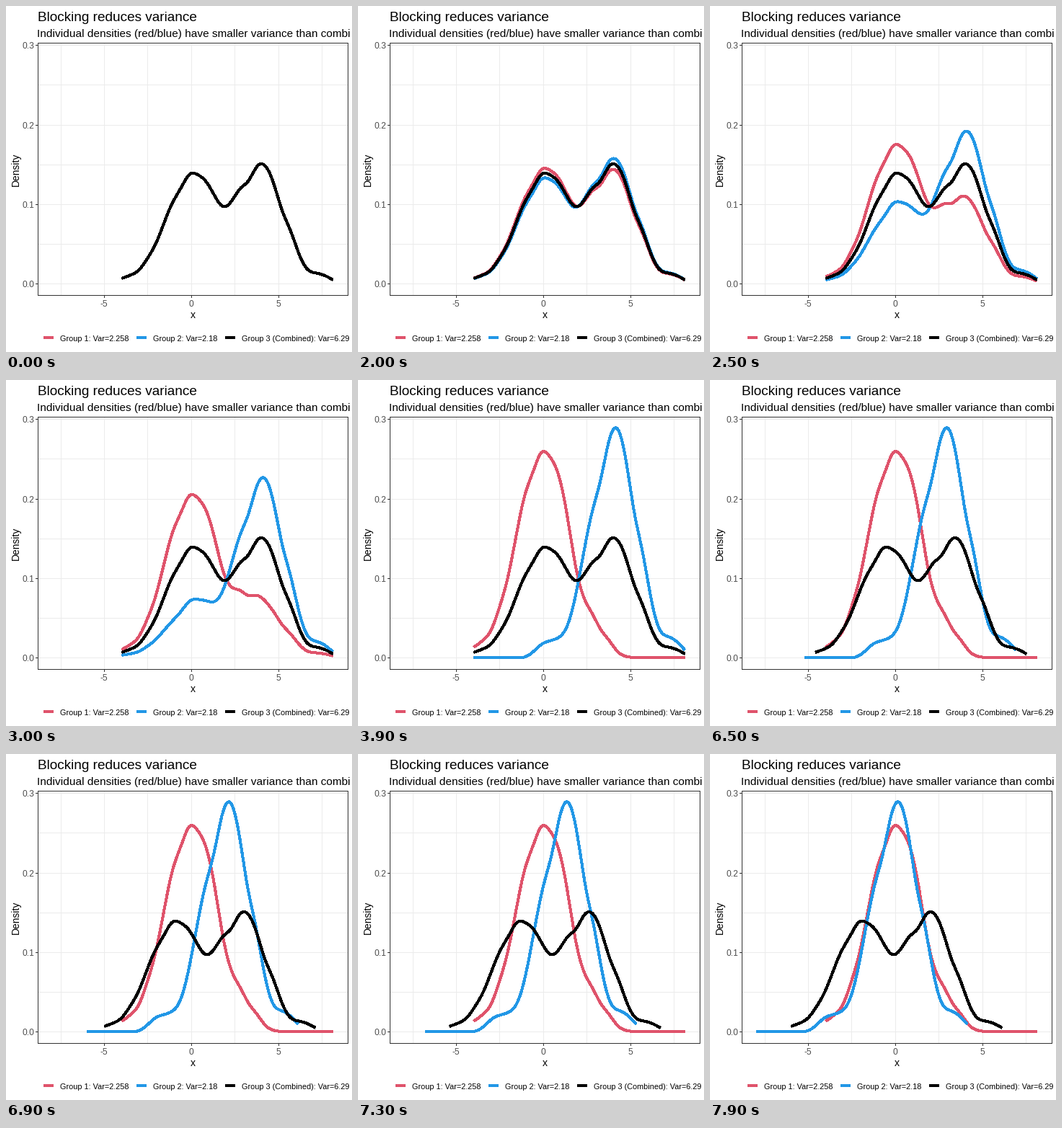
Recreate the animation shown at these times as a matplotlib script. Size 480x480 px, loop 10 s.

```python
import numpy as np
import matplotlib.pyplot as plt
from matplotlib.animation import FuncAnimation
from matplotlib.patches import Rectangle

SIZE, DPI = 480, 80
PT = 72 / DPI                      # points per pixel
RED, BLUE, BLACK = "#DF536B", "#2297E6", "black"
GRID, FRAME, TICK_TEXT = "#EBEBEB", "#333333", "#4D4D4D"
LEFT, RIGHT, TOP, BOTTOM = 44, 474, 51, 401

plt.rcParams["font.family"] = "Liberation Sans"


def px(x):
    return 256.8 + 24.16 * x


def py(density):
    return 384.98 - 1102.2 * density


def spline(knots, values, x):
    """Natural cubic spline on evenly spaced knots."""
    n, h = len(knots), knots[1] - knots[0]
    system = np.eye(n)
    rhs = np.zeros(n)
    for i in range(1, n - 1):
        system[i, i - 1:i + 2] = 1, 4, 1
        rhs[i] = 6 * (values[i - 1] - 2 * values[i] + values[i + 1]) / h**2
    m = np.linalg.solve(system, rhs)
    i = np.clip(((x - knots[0]) / h).astype(int), 0, n - 2)
    b = (x - knots[i]) / h
    a = 1 - b
    return (a * values[i] + b * values[i + 1]
            + ((a**3 - a) * m[i] + (b**3 - b) * m[i + 1]) * h**2 / 6)


# Group densities in thousandths at even steps of x
group1 = [13, 21, 34, 62.5, 100, 153, 203, 233.5, 258, 252.7, 230.9,
          182.3, 118.3, 76.5, 56, 36, 22, 8, 1.5] + [0] * 7
group2 = [0] * 6 + [0.6, 7, 16.5, 21, 25, 38.3, 75.6, 131, 182.5, 222.5, 272,
                    288, 250, 183.7, 132.8, 74.7, 36, 26.5, 20.5, 9.5]
knots = np.linspace(-3.97, 8.13, 26)
grid = np.linspace(-3.97, 8.13, 512)
dens1, dens2 = (np.maximum(spline(knots, np.array(g) / 1000, grid), 0)
                for g in (group1, group2))
combined = (dens1 + dens2) / 2

fig = plt.figure(figsize=(SIZE / DPI, SIZE / DPI), dpi=DPI, facecolor="white")
ax = fig.add_axes([0, 0, 1, 1])
ax.set_xlim(0, SIZE)
ax.set_ylim(SIZE, 0)
ax.axis("off")


def segment(xs, ys, color, width=1, z=1):
    ax.plot(xs, ys, color=color, lw=width * PT, zorder=z, antialiased=False,
            solid_capstyle="butt")


def label(x, y, text, size, color="black", **kw):
    ax.text(x, y, text, fontsize=size * PT, color=color, **kw)


for v in np.arange(-7.5, 8, 2.5):
    segment([px(v)] * 2, [TOP, BOTTOM], GRID)
for v in np.arange(0, 0.31, 0.05):
    segment([LEFT, RIGHT], [py(v)] * 2, GRID)

for v in (-5, 0, 5):
    segment([px(v)] * 2, [BOTTOM, BOTTOM + 3], FRAME)
    label(px(v), 417.3, str(v), 12, TICK_TEXT, ha="center")
for v in (0, 0.1, 0.2, 0.3):
    segment([LEFT - 3, LEFT], [py(v)] * 2, FRAME)
    label(39.5, py(v) + 5, f"{v:.1f}", 12, TICK_TEXT, ha="right")

ax.add_patch(Rectangle((LEFT, TOP), RIGHT - LEFT, BOTTOM - TOP, fill=False,
                       ec=FRAME, lw=PT, zorder=6, antialiased=False))

label(43.5, 21, "Blocking reduces variance", 19)
label(43, 42.6, "Individual densities (red/blue) have smaller variance than combi",
      15.4)
label(259, 433, "x", 14, ha="center")
label(18, 226.5, "Density", 13.9, rotation=90, rotation_mode="anchor",
      ha="center")

legend = [(52, RED, "Group 1: Var=2.258"),
          (181, BLUE, "Group 2: Var=2.18"),
          (304, BLACK, "Group 3 (Combined): Var=6.29")]
for x, color, text in legend:
    segment([x, x + 14], [460, 460], color, 4)
    label(x + 22.6, 465, text, 10.9)

# Without antialiasing every touched pixel is filled, so 3 draws 4 wide
curves = [ax.plot([], [], color=c, lw=3 * PT, zorder=z, antialiased=False,
                  solid_capstyle="butt", solid_joinstyle="round")[0]
          for z, c in enumerate((RED, BLUE, BLACK), 3)]


def draw(i):
    split = np.clip((i - 19) / 20, 0, 1)
    shift = np.clip((i - 59) / 20, 0, 1)
    states = [(dens1, 0), (dens2, 4), (combined, 2)]
    for curve, (dens, move) in zip(curves, states):
        y = combined + split * (dens - combined)
        curve.set_data(px(grid - move * shift), py(y))
    return curves


anim = FuncAnimation(fig, draw, frames=100, interval=100, repeat=True,
                     repeat_delay=0, blit=False)
plt.show()
```
